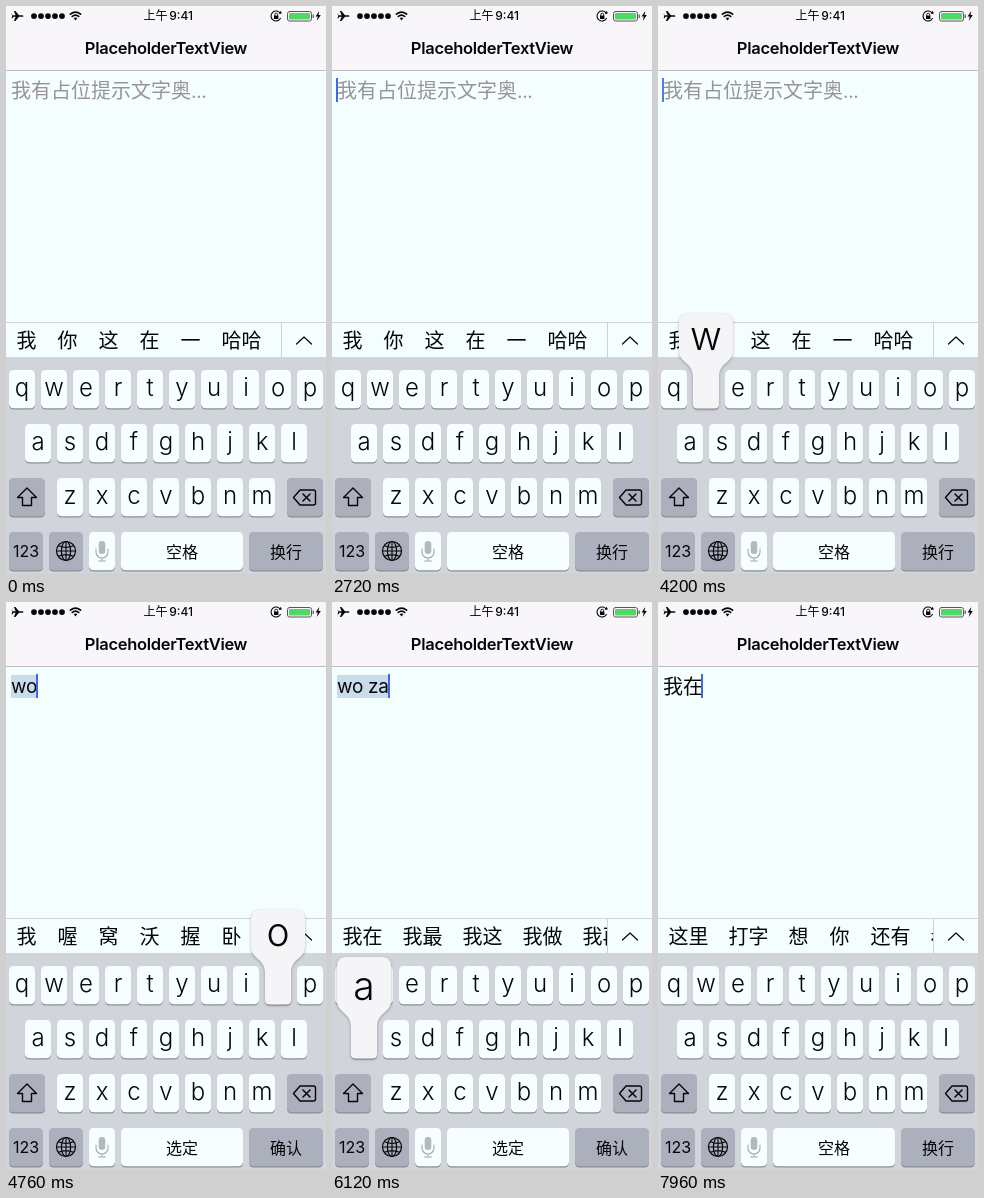
Recreate the animation shown at these times as an HTML page with a canvas. Size 320 by 568 pixels, loop 8 s.

```html
<!DOCTYPE html>
<html lang="zh-CN">
<head>
<meta charset="utf-8">
<title>PlaceholderTextView</title>
<style>
html, body { margin: 0; width: 100%; height: 100%; overflow: hidden; background: #f5feff; }
canvas { display: block; width: 320px; height: 568px; }
</style>
</head>
<body>
<canvas id="stage"></canvas>
<script>
const LOOP = 8000;
const FONT = 'Inter, "Noto Sans CJK SC", "Noto Sans CJK", sans-serif';
const INK = '#050608', PAPER = '#f5feff', KEY = '#f7feff', DARK_KEY = '#abb0bc';
const PLACEHOLDER = '我有占位提示文字奥';

// time, text, whether it is still being composed, suggestions
const STATES = [
  [0, '', false, '我 你 这 在 一 哈哈'],
  [4320, 'w', true, '我 为 问 玩 无 晚 万'],
  [4760, 'wo', true, '我 喔 窝 沃 握 卧 哦'],
  [5680, 'wo z', true, '我 喔 窝 沃 握 卧 哦'],
  [5840, 'wo z', true, '我在 我这 我自 我走 我怎'],
  [6120, 'wo za', true, '我在 我最 我这 我做 我再'],
  [6920, 'wo zai', true, '我在 我再 窝在 握在 卧在'],
  [7480, '我在', false, '这里 打字 想 你 还有 看'],
];
const PRESSES = [
  ['w', 4200, 4440], ['o', 4600, 4840], ['z', 5520, 5880],
  ['a', 6000, 6240], ['i', 6480, 6960],
];
const ROWS = [['qwertyuiop', 3, 364], ['asdfghjkl', 19, 418], ['zxcvbnm', 51, 472]];

const canvas = document.getElementById('stage');
const ctx = canvas.getContext('2d');
const ratio = window.devicePixelRatio || 1;
canvas.width = 320 * ratio;
canvas.height = 568 * ratio;

function rect(x, y, w, h, color) {
  ctx.fillStyle = color;
  ctx.fillRect(x, y, w, h);
}

function rounded(x, y, w, h, r, color) {
  ctx.beginPath();
  ctx.roundRect(x, y, w, h, r);
  ctx.fillStyle = color;
  ctx.fill();
}

function setFont(size, weight = 400, spacing = 0) {
  ctx.font = `${weight} ${size}px ${FONT}`;
  ctx.letterSpacing = spacing + 'px';
}

function text(str, x, y, align = 'left', color = INK) {
  ctx.textAlign = align;
  ctx.fillStyle = color;
  ctx.fillText(str, x, y);
}

function stroke(path, width = 1.4, color = INK) {
  ctx.lineWidth = width;
  ctx.strokeStyle = color;
  ctx.lineJoin = ctx.lineCap = 'round';
  ctx.stroke(new Path2D(path));
}

function fill(path, color = INK) {
  ctx.fillStyle = color;
  ctx.fill(new Path2D(path));
}

function drawStatusBar() {
  rect(0, 0, 320, 64, '#f8f6f9');
  rect(0, 64, 320, 1, '#bfbdc1');
  fill('M6 9.2H9.6L7.9 5H9.4L13 9.2H16.5Q18.6 10 16.5 10.8H13L9.4 15H7.9L9.6 10.8H7.6L6.4 12.2H5.6L6.2 10L5.6 7.8H6.4Z');
  for (let i = 0; i < 5; i++) rounded(25.1 + i * 7, 7.2, 5.8, 5.8, 2.9, INK);
  stroke('M64.4 8.2Q69.5 3.9 74.6 8.2M66.3 10.4Q69.5 7.8 72.7 10.4', 1.7);
  fill('M67.6 12.1Q69.5 10.8 71.4 12.1L69.5 14.4Z');
  setFont(12, 500);
  text('上午', 137.5, 14.3);
  text('9:41', 187, 14.3, 'right');

  stroke('M274.2 7.2A5 5 0 1 0 274.4 12.4', 1.1);
  fill('M272.6 7.8L275.8 7.6L274.8 4.8Z');
  rect(268, 9.6, 4.4, 3.4, INK);
  stroke('M268.8 9.6V8.6A1.4 1.4 0 0 1 271.6 8.6V9.6', .9);
  ctx.beginPath();
  ctx.roundRect(281.5, 5.5, 24, 9.5, 2);
  ctx.lineWidth = 1;
  ctx.strokeStyle = '#55575a';
  ctx.stroke();
  rounded(283, 7, 21, 6.5, 1, '#4cd964');
  rect(306.6, 8.5, 1.2, 3.5, '#55575a');
  fill('M313.2 5L309.6 10.6H311.8L310.8 15L314.8 9H312.5Z');

  setFont(16.5, 600, -.3);
  text('PlaceholderTextView', 160, 48, 'center');
}

function caretAlpha(t, typedAt) {
  const ramp = (v, from, to) => Math.min(1, Math.max(0, (v - from) / (to - from)));
  if (typedAt) {
    const age = t - typedAt;
    return age < 720 ? 1 - ramp(age, 560, 640) : ramp(age, 760, 860);
  }
  const phase = t % 1100;
  return phase < 600 ? ramp(phase, 140, 330) : 1 - ramp(phase, 880, 1080);
}

function drawEditor(t, state) {
  const [typedAt, content, composing] = state;
  rect(0, 65, 320, 251, PAPER);
  let caretX = 4;
  if (!content) {
    setFont(20);
    text(PLACEHOLDER, 5, 92, 'left', '#979398');
    setFont(19, 400, -.3);
    text('...', 185, 92, 'left', '#979398');
  } else {
    if (composing) setFont(19, 400, -.3);
    else setFont(20);
    const width = ctx.measureText(content).width;
    if (composing) rect(5, 73, width, 23, '#c9dcec');
    text(content, 5, composing ? 91 : 92);
    caretX = Math.floor((composing ? 5 : 4) + width);
  }
  ctx.globalAlpha = caretAlpha(t, typedAt);
  rect(caretX, 72, 2, 24, '#4169e1');
  ctx.globalAlpha = 1;
}

function drawSuggestions(words) {
  rect(0, 316, 320, 36, PAPER);
  rect(0, 316, 320, 1, '#d0d2d6');
  ctx.save();
  ctx.beginPath();
  ctx.rect(0, 316, 275, 36);
  ctx.clip();
  setFont(20);
  let x = 10.5;
  for (const word of words.split(' ')) {
    text(word, x, 341.5);
    x += 22 + 19 * word.length;
  }
  ctx.restore();
  rect(275, 317, 1, 35, '#cfd2d6');
  stroke('M290.5 338L298 331L305.5 338', 1.2);
}

function drawKey(x, y, w, color = KEY) {
  rounded(x, y + 1, w, 38.5, 4.5, '#8b8e94');
  rounded(x, y, w, 38.3, 4.5, color);
}

function drawKeyboard(composing) {
  rect(0, 351, 320, 217, '#d1d4da');
  for (const [letters, left, y] of ROWS) {
    [...letters].forEach((letter, i) => {
      const x = left + i * 32;
      drawKey(x, y, 26);
      setFont(24, 300);
      text(letter, x + 13, y + 26, 'center');
    });
  }

  drawKey(3, 472, 36, DARK_KEY);
  stroke('M21 482L30.5 491.5H25.5V499.5H16.5V491.5H11.5Z');
  drawKey(281, 472, 36, DARK_KEY);
  stroke('M294 484H307.5Q309.5 484 309.5 486V497Q309.5 499 307.5 499H294L287.5 491.5Z');
  stroke('M297 488L304 495M304 488L297 495', 1.5);

  drawKey(3, 526, 34, DARK_KEY);
  drawKey(43, 526, 34, DARK_KEY);
  drawKey(83, 526, 26);
  drawKey(115, 526, 122);
  drawKey(243, 526, 74, DARK_KEY);
  setFont(16);
  text('123', 20, 551, 'center');
  text(composing ? '选定' : '空格', 176, 551.5, 'center');
  text(composing ? '确认' : '换行', 280, 551.5, 'center');

  ctx.lineWidth = 1.2;
  ctx.strokeStyle = INK;
  for (const rx of [9.5, 4.6]) {
    ctx.beginPath();
    ctx.ellipse(60, 545, rx, 9.5, 0, 0, Math.PI * 2);
    ctx.stroke();
  }
  stroke('M60 535.5V554.5M50.5 545H69.5M52.5 539.8Q60 543 67.5 539.8M52.5 550.2Q60 547 67.5 550.2', 1.1);

  rounded(92.7, 535, 6.6, 13, 3.3, '#b5b9be');
  stroke('M90 543V546A6 6 0 0 0 102 546V543M96 552V555M92.5 555H99.5', 1.1, '#a5a9af');
}

function drawPopup(letter) {
  const [letters, left, y] = ROWS.find(row => row[0].includes(letter));
  const cx = left + letters.indexOf(letter) * 32 + 13;
  const top = y - (y === 364 ? 56 : 63);
  const L = cx - 27, R = cx + 27, k = cx - 13, m = cx + 13;
  ctx.save();
  ctx.shadowColor = 'rgba(60,65,75,.4)';
  ctx.shadowBlur = 3 * ratio;
  ctx.shadowOffsetY = ratio;
  fill(`M${L + 9} ${top}H${R - 9}Q${R} ${top} ${R} ${top + 9}V${y - 19}
    C${R} ${y - 7} ${m} ${y - 8} ${m} ${y + 7}V${y + 34}Q${m} ${y + 38.5} ${m - 4.5} ${y + 38.5}
    H${k + 4.5}Q${k} ${y + 38.5} ${k} ${y + 34}V${y + 7}
    C${k} ${y - 8} ${L} ${y - 7} ${L} ${y - 19}V${top + 9}Q${L} ${top} ${L + 9} ${top}Z`, '#f5f4f6');
  ctx.restore();
  setFont(39, 300);
  text(letter, cx, y - 20, 'center');
}

function draw(t) {
  const state = STATES.filter(s => s[0] <= t).pop();
  // A later suggestion refresh keeps the time of the keystroke itself.
  const typed = STATES.find(s => s[1] === state[1]);
  ctx.setTransform(ratio, 0, 0, ratio, 0, 0);
  ctx.textBaseline = 'alphabetic';
  drawStatusBar();
  drawEditor(t, typed);
  drawSuggestions(state[3]);
  drawKeyboard(state[2]);
  for (const [letter, from, to] of PRESSES) {
    if (t >= from && t < to) drawPopup(letter);
  }
}

const start = performance.now();
function tick() {
  draw((performance.now() - start) % LOOP);
  requestAnimationFrame(tick);
}
tick();
</script>
</body>
</html>
```
